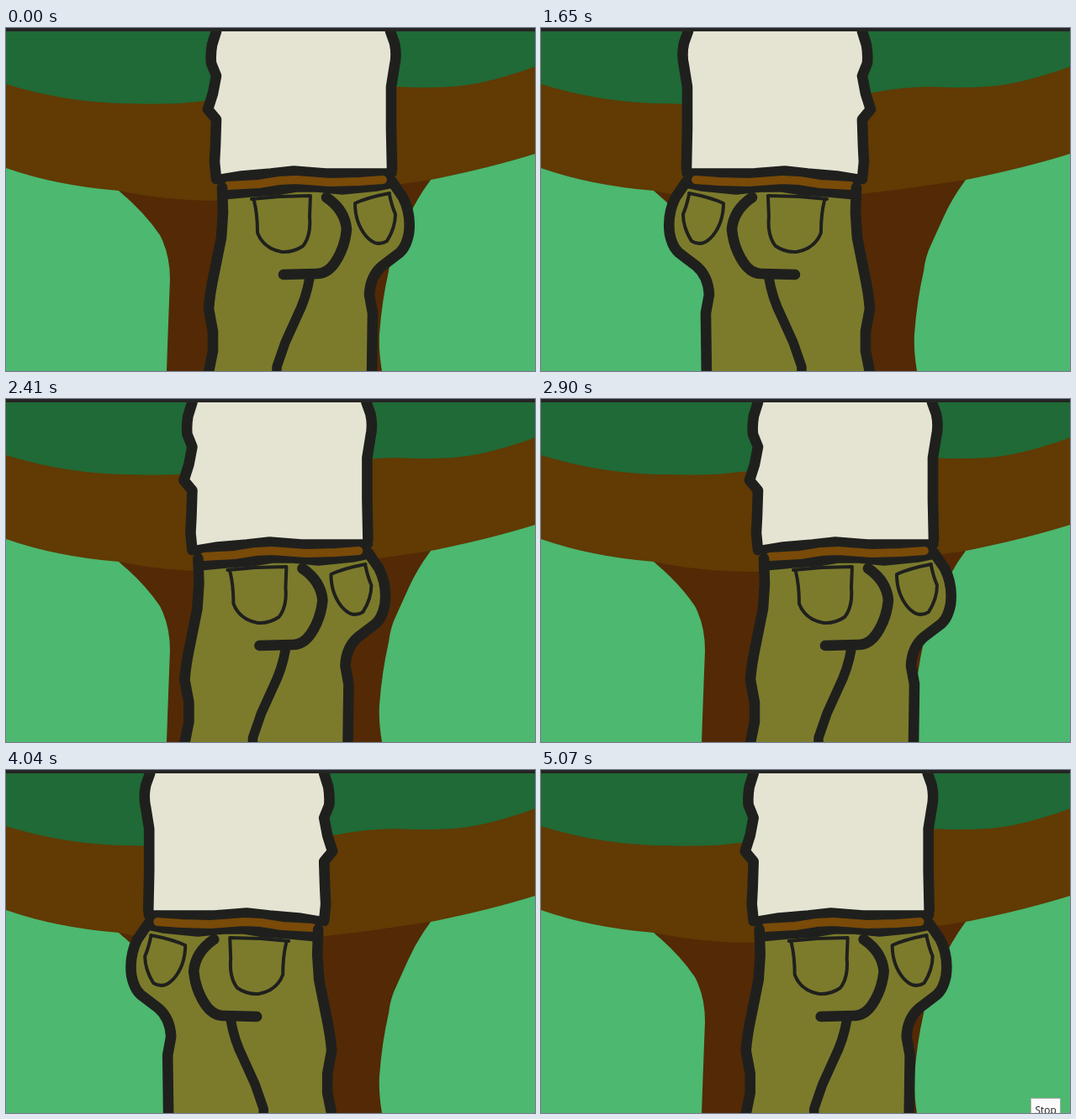
An HTML page that plays this animation: 629x409 px, repeating every 5120 ms.

```html
<!DOCTYPE html>
<html lang="en">
<head>
<meta charset="utf-8">
<title>Sway</title>
<style>
  html, body { margin: 0; height: 100%; overflow: hidden; background: #4cb870; }
  svg { display: block; width: 100vw; height: 100vh; }
  .ink { fill: none; stroke: #1f201d; stroke-width: 12.6; stroke-linecap: round; stroke-linejoin: round; }
  .ink .medium { stroke-width: 11.5; }
  .ink .thin { stroke-width: 4; }
  .ink .belt { stroke: #794a08; stroke-width: 10; }
</style>
</head>
<body>
<svg viewBox="0 0 629 409">
  <g id="tree">
    <path fill="#4cb870" d="M0 0H629V409H0Z"/>
    <path fill="#532a05" d="M134 194Q165 220 183 247Q195 270 195 300Q193 350 191 409H447Q443 385 444 365Q447 325 455 290Q457 272 464 258L478 227Q488 204 505 181L320 170Z"/>
    <path fill="#613a04" d="M0 60V167Q60 188 134 194Q190 206 255 206Q320 206 380 198L430 192L505 181Q575 167 629 150V40Z"/>
    <path fill="#1f6a36" d="M0 0V67Q75 90 150 90Q200 92 235 87Q320 82 395 77Q430 70 465 70C500 72 535 71 560 66S610 53 629 46V0Z"/>
  </g>
  <g id="figure">
    <path fill="#7c7b2c" d="M257 190V250L248 290L241 335L246 365V385L240 415H435V340L432 318Q433 296 447 284L468 268Q490 240 472 202L459 184Z"/>
    <path fill="#e5e3d2" d="M250 0L244 20V40L250 57L240 97L250 108V176L340 170H459L458 70L464 40L457 0Z"/>
    <path fill="#1f201d" d="M256 180L340 170L459 173V188L370 190L257 199Z"/>
    <g class="ink">
      <path d="M250 -4V4L245 20Q243 32 244 42L250 57L246 78L240 97L250 109L249 140L248 160L250 180"/>
      <path d="M457 -4V4L462 18Q465 32 462 45L458 70V120L459 168"/>
      <path class="medium" d="M256 180L280 176L315 173L342 170L380 173L425 173L459 173"/>
      <path class="medium" d="M258 199L290 196L320 194L345 190L370 190L400 193L440 189L459 185"/>
      <path class="belt" d="M264 188L300 186L325 182L345 181L385 184L420 183L448 181"/>
      <path d="M257 190L258 220L256 250L248 290Q242 318 241 335L246 362V385L240 415"/>
      <path d="M459 183L472 202Q482 222 479 245Q476 261 468 268L447 284Q433 296 432 318L436 340L435 415"/>
      <path d="M381 202Q403 217 405 240Q403 262 391 280Q382 293 370 293L330 294"/>
      <path class="medium" d="M361 298Q357 322 346 344L332 375L322 404V415"/>
      <path class="thin" d="M292 204L325 201L362 200L361 225Q363 248 353 260Q341 268 328 267Q306 263 299 244Q299 222 295 206"/>
      <path class="thin" d="M456 199Q459 213 463 222Q463 238 453 254Q440 262 428 248Q415 232 415 209Q430 202 456 197"/>
    </g>
  </g>
  <path fill="#252525" d="M0 0H629V4H0Z"/>
  <g id="button">
    <path fill="#fbfbfb" stroke="#a9aaa9" d="M582.5 391.5H617.5V420H582.5Z"/>
    <text x="587.5" y="410" font-size="12" font-family="'Open Sans', sans-serif" fill="#222">Stop</text>
  </g>
</svg>
<script>
  const LOOP = 5120, HOLD = 450, BUTTON_AT = 5060;
  const figure = document.getElementById('figure');
  const button = document.getElementById('button');

  // Horizontal centre and facing; the flip pivots slightly off centre.
  function pose(t) {
    if (t < HOLD) return { centre: 360, facing: 1 };
    const phase = (0.1568 * (t - 667) + 1.5) * Math.PI / 180;
    const facing = Math.cos(phase) > 0 ? 1 : -1;
    const sway = 38.5 * Math.cos(phase) + 1.5 * Math.cos(3 * phase);
    return { centre: 318 + sway + 10.5 * facing, facing };
  }

  function draw() {
    const t = performance.now() % LOOP;
    const { centre, facing } = pose(t);
    figure.setAttribute('transform', `translate(${centre}) scale(${facing} 1) translate(-360)`);
    button.setAttribute('visibility', t >= BUTTON_AT ? 'visible' : 'hidden');
    requestAnimationFrame(draw);
  }
  draw();
</script>
</body>
</html>
```
